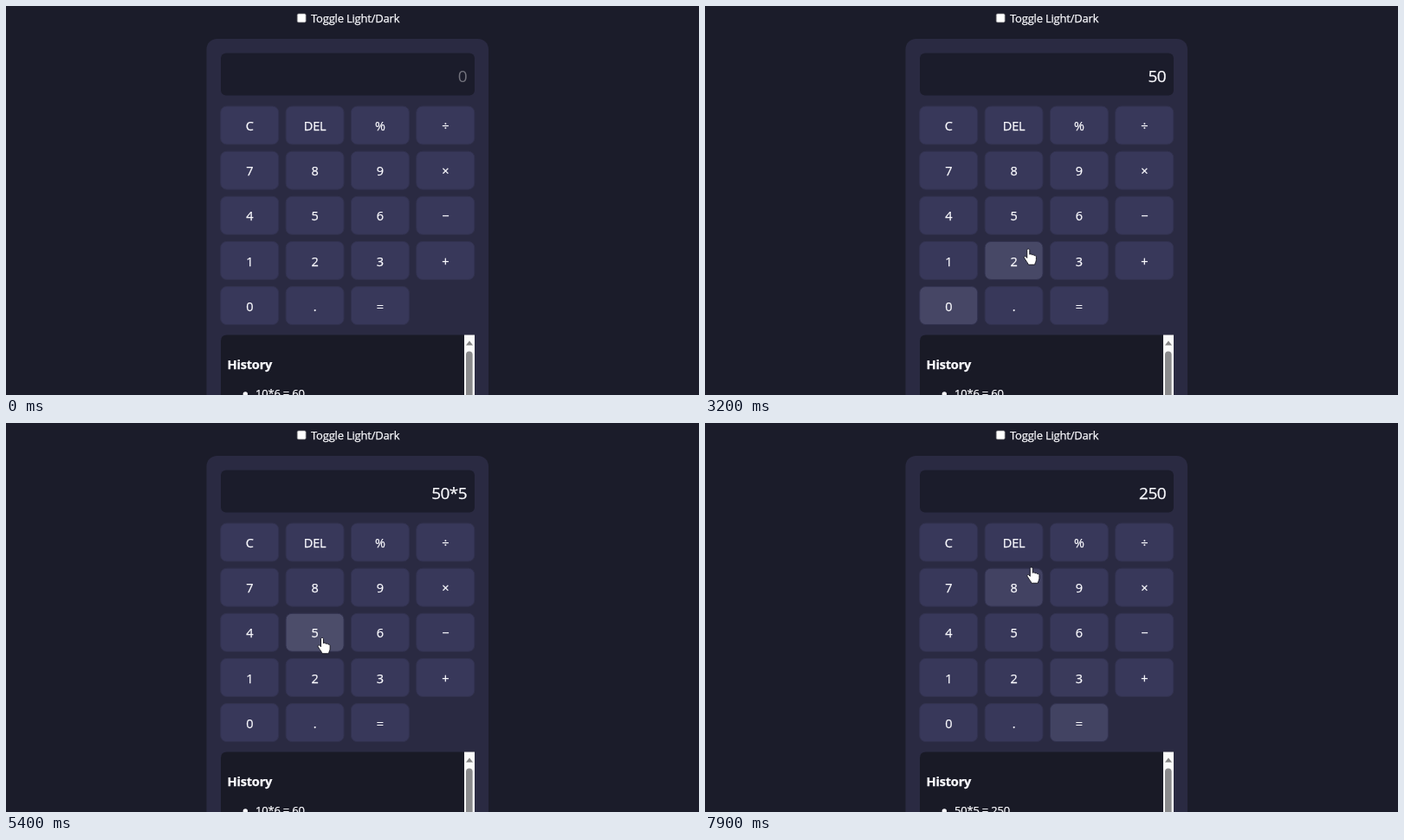
An HTML page for the animation above (8 s loop, 800 px wide and 450 px high).

```html
<!DOCTYPE html>
<html lang="en">
<head>
<meta charset="utf-8">
<title>Calculator</title>
<style>
  html, body { margin: 0; width: 100%; height: 100%; overflow: hidden; background: #1b1c2a; }
  svg { display: block; width: 100vw; height: 100vh; }
  text {
    font: 13px "Open Sans", "Noto Sans", sans-serif; letter-spacing: -.015em;
    fill: #fbfbff; stroke: #fbfbff; stroke-width: .25px;
  }
  .key rect { stroke: #32324f; }
  .key text { font-size: 14.5px; text-anchor: middle; }
  #readout { font-size: 19px; letter-spacing: -.03em; text-anchor: end; }
  #readout.empty { fill: #73737d; stroke: none; }
  #title { font-size: 14.6px; font-weight: 700; }
</style>
</head>
<body>
<svg viewBox="0 0 800 450">
  <rect width="800" height="450" fill="#1b1c2a"/>
  <rect x="336.2" y="8.9" width="10" height="10" rx="1.6" fill="#fff" stroke="#77777c" stroke-width=".7"/>
  <text x="352" y="19">Toggle Light/Dark</text>

  <rect x="231.5" y="38" width="325.5" height="430" rx="12" fill="#2a2a42"/>
  <rect x="248" y="54.5" width="293" height="49" rx="6" fill="#1b1c2b"/>
  <text id="readout" x="532" y="87.5"></text>
  <g id="keys"></g>

  <path d="M248 460V387.5q0-7 7-7H541V460z" fill="#191a26"/>
  <path d="M529 380.5H541V450H529z" fill="#fafafa"/>
  <path d="M531 392.5l4-5.2 4 5.2z" fill="#858585"/>
  <rect x="531" y="399.5" width="7.6" height="80" rx="3.8" fill="#8a8a8c"/>
  <text id="title" x="255.5" y="420">History</text>
  <circle cx="276.3" cy="449" r="2.7" fill="#fbfbff"/>
  <text id="entry" x="288" y="453"></text>

  <g id="cursor">
    <path transform="scale(.95)" fill="#fff" stroke="#15151f" stroke-linejoin="round"
      d="M-1.8 1.6C-1.8-.6 1.4-.6 1.4 1.6V6.6C2.4 5.8 4 6.1 4.3 7.3C5.4 6.6 6.8 7 7.1 8.1C8.3 7.7 9.4 8.4 9.4 9.8V13.2C9.4 15.6 7.9 16.8 7.7 19.2H-.2C-.6 17.2-2.3 15.6-3.5 13.6L-5.3 10.7C-5.9 9.3-4.1 8.3-3 9.5L-1.8 10.9Z"/>
  </g>
</svg>
<script>
  const LOOP = 8000, STEP = 100, FADE_IN = 200, FADE_OUT = 650;
  const KEY_W = 67, KEY_H = 44;
  const LABELS = [..."C", "DEL", ..."%÷789×456−123+0.="];

  // Places where the pointer rests, and what a click there shows
  const STOPS = [
    { x: 545, y: 470, arrive: 0, leave: 100 },
    { x: 350, y: 247, arrive: 900, leave: 1750, press: 1600, shows: "5" },
    { x: 302, y: 337, arrive: 2250, leave: 2850, press: 2700, shows: "50" },
    { x: 505, y: 178, arrive: 3725, leave: 4250, press: 4000, shows: "50*" },
    { x: 360, y: 242, arrive: 4950, leave: 5300, press: 5100, shows: "50*5" },
    { x: 430, y: 330, arrive: 5900, leave: 7550, press: 6300, shows: "250" },
    { x: 377, y: 167, arrive: 7900, leave: LOOP }
  ];

  const $ = id => document.getElementById(id);
  const clamp = v => Math.max(0, Math.min(1, v));
  const ease = k => k * k * (3 - 2 * k);
  const mix = (a, b, k) => a + (b - a) * k;

  function add(parent, tag, attrs, content = "") {
    const node = document.createElementNS("http://www.w3.org/2000/svg", tag);
    for (const name in attrs) node.setAttribute(name, attrs[name]);
    node.textContent = content;
    return parent.appendChild(node);
  }

  const keys = LABELS.map((label, i) => {
    const x = 247.7 + (i % 4) * 75.35, y = 116 + Math.floor(i / 4) * 52.15;
    const group = add($("keys"), "g", { class: "key" });
    const face = add(group, "rect", { x, y, width: KEY_W, height: KEY_H, rx: 7 });
    add(group, "text", { x: x + KEY_W / 2, y: y + 28.1 }, label);
    return { x, y, face };
  });

  function pointer(t) {
    const i = STOPS.findLastIndex(s => s.arrive <= t);
    const from = STOPS[i], to = STOPS[i + 1] || from;
    const k = ease(clamp((t - from.leave) / (to.arrive - from.leave)));
    return { x: mix(from.x, to.x, k), y: mix(from.y, to.y, k) };
  }

  // Replays the recent pointer path so that the fade depends on time alone
  function glow(key, t) {
    const dt = 10;
    let level = 0;
    for (let s = Math.max(0, t - FADE_IN - FADE_OUT); s < t; s += dt) {
      const p = pointer(s);
      const over = p.x > key.x && p.x < key.x + KEY_W && p.y > key.y && p.y < key.y + KEY_H;
      level = clamp(level + (over ? dt / FADE_IN : -dt / FADE_OUT));
    }
    return level;
  }

  function draw(t) {
    for (const key of keys) {
      const k = glow(key, t);
      key.face.setAttribute("fill", `rgb(${mix(56, 76, k)}, ${mix(56, 77, k)}, ${mix(90, 106, k)})`);
    }
    const shown = STOPS.findLast(s => s.press <= t)?.shows;
    $("readout").textContent = shown ?? "0";
    $("readout").classList.toggle("empty", !shown);
    $("entry").textContent = shown === "250" ? "50*5 = 250" : "10*6 = 60";
    const { x, y } = pointer(t);
    $("cursor").setAttribute("transform", `translate(${x} ${y})`);
  }

  const origin = performance.now();
  function tick() {
    const t = (performance.now() - origin) % LOOP;
    draw(Math.floor(t / STEP) * STEP);
    requestAnimationFrame(tick);
  }
  tick();
</script>
</body>
</html>
```
